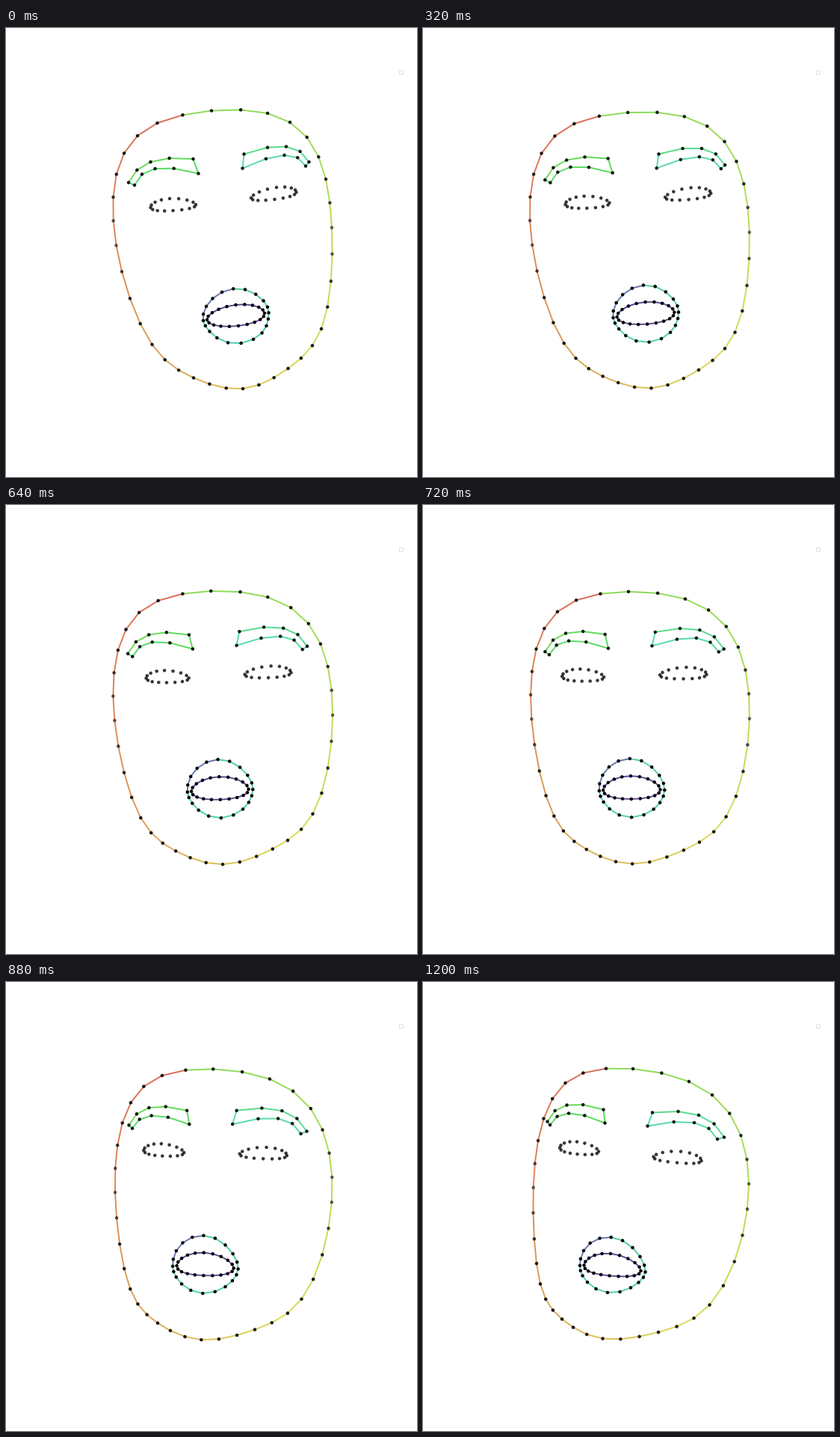
Animation, 550 px wide and 600 px high, one loop 1.28 s. Source, as a matplotlib script:

```python
import colorsys

import matplotlib.pyplot as plt
import numpy as np
from matplotlib.animation import FuncAnimation
from matplotlib.collections import LineCollection
from matplotlib.patches import FancyBboxPatch

W, H, DPI = 550, 600, 100
FRAMES, INTERVAL = 16, 80


def ring(count, *keys):
    """Closed trigonometric curve through evenly spaced key points."""
    keys = np.array(keys, float)
    n = len(keys)
    u = np.pi * (np.arange(count)[:, None] / count - np.arange(n) / n)
    at_key = np.isclose(np.sin(u), 0)
    safe = np.where(at_key, 1, u)
    weights = np.where(at_key, 1, np.sin(n * safe) / (n * np.tan(safe)))
    return weights @ keys


def arc(a, b, c):
    """Five points on the parabola through a, b and c."""
    t = np.linspace(0, 1, 5)[:, None]
    a, b, c = np.array([a, b, c], float)
    return (1 - t) * (1 - 2 * t) * a + 4 * t * (1 - t) * b + t * (2 * t - 1) * c


def brow(top, bottom):
    return np.vstack([arc(*top), arc(*bottom)])


def wave(amount, phase):
    return amount * np.cos(np.arange(36) * np.pi / 18 - np.radians(phase))


def ramp(first, last, count):
    return np.linspace(first, last, count)


def palette(hues, light=0.6, sat=0.65):
    return [colorsys.hls_to_rgb(h / 360, light, sat) for h in hues]


def lip_bow(lips):
    """The mouth opens upwards halfway through the turn."""
    return np.column_stack([np.full(len(lips), 0.8),
                            0.07 * (lips[:, 1] - 386) - 3])


# Key points of the face turned to one side (start) and the other (end).
outline = (
    ring(36, (275, 110.5), (380, 126), (428, 202), (436.5, 302),
         (422, 402), (377.5, 455), (317, 482), (251, 467.5),
         (195.5, 423), (155, 325.5), (143.5, 226), (176, 144)),
    ring(36, (281, 116), (387, 151), (433.5, 237), (427.5, 338.5),
         (383.5, 431.5), (315, 468), (240.5, 476.5), (186, 450.5),
         (157, 403.5), (147.5, 308.5), (154, 212), (190.5, 135)))
left_brow = (
    brow([(164, 206.5), (193.5, 179), (250.5, 175)],
         [(257.5, 194.5), (199.5, 188), (172, 210)]),
    brow([(166.5, 186.5), (192.5, 164.5), (241.5, 170.5)],
         [(243.5, 188.5), (195, 175.5), (170, 191)]))
right_brow = (
    brow([(318.5, 168.5), (375, 158.5), (405.5, 179)],
         [(401, 184.5), (372.5, 170), (316.5, 187.5)]),
    brow([(307, 174.5), (369, 178), (403, 207.5)],
         [(394, 210), (363, 188), (300.5, 192.5)]))
left_eye = (
    ring(16, (193.5, 240), (219, 228), (254, 236), (223.5, 244)),
    ring(16, (183, 221.5), (206, 213.5), (235, 226.5), (206.5, 230)))
right_eye = (
    ring(16, (328, 227), (362, 213), (388.5, 219.5), (359.5, 229)),
    ring(16, (308.5, 233.5), (345, 226.5), (372.5, 239), (340, 241.5)))
lips = (
    ring(20, (264, 391), (268, 372), (289, 353), (320, 349.5), (344.5, 364.5),
         (351.5, 380.5), (348.5, 398), (331, 416), (297, 420.5), (272.5, 405.5)),
    ring(20, (210, 379), (215, 359), (236.5, 342.5), (267, 345.5), (290.5, 367),
         (297.5, 387.5), (288.5, 401.5), (263.5, 414), (231.5, 410), (213.5, 392.5)))
mouth = (
    ring(20, (269, 390), (307.5, 370), (346, 381), (311, 398)),
    ring(20, (215.5, 378.5), (251, 363), (291.5, 386), (249.5, 392.5)))

outline_bow = np.column_stack([0.5 + wave(4.4, 150), 1.4 + wave(2.7, 290)])
outline_hues = np.r_[10 + 87 * ramp(1, 0, 35) ** 1.15, 97]
lip_colors = (palette(ramp(222, 228, 5), 0.55, 0.32)
              + palette(ramp(155, 170, 15), 0.56, 0.58))

# poses, bow of the path halfway, dot opacity, line colours
FEATURES = [
    (outline, outline_bow, None, palette(outline_hues)),
    (left_brow, (-2, 0.3), 0.9, palette(ramp(108, 135, 10))),
    (right_brow, (-1.5, -1.9), 0.9, palette(ramp(142, 160, 10))),
    (left_eye, (-1.7, -1), 0.78, None),
    (right_eye, (-0.5, -3.4), 0.78, None),
    (lips, lip_bow(lips[0]), 1, lip_colors),
    (mouth, lip_bow(mouth[0]), 1, palette(ramp(240, 268, 20), 0.45, 0.35)),
]


def turn(frame):
    return np.interp(frame, [0, 4, 6, 8, 10, 13, 15],
                     [0, 0.185, 0.315, 0.407, 0.667, 0.97, 1])


def pose(poses, bow, frame):
    t = turn(frame)
    return (1 - t) * poses[0] + t * poses[1] + 4 * t * (1 - t) * np.asarray(bow)


def dot_colors(points, opacity):
    rgba = np.zeros((len(points), 4))
    if opacity is None:  # the sides lie deeper, so they fade
        opacity = 0.9 - 0.32 * np.exp(-((points[:, 1] - 280) / 65) ** 2)
    rgba[:, 3] = opacity
    return rgba


fig = plt.figure(figsize=(W / DPI, H / DPI), dpi=DPI, facecolor="white")
ax = fig.add_axes([0, 0, 1, 1])
ax.set(xlim=(0, W), ylim=(H, 0))
ax.axis("off")
ax.add_patch(FancyBboxPatch((527, 57.5), 4, 4, facecolor="white",
                            boxstyle="round,pad=0.5,rounding_size=1",
                            edgecolor="#dddddd", linewidth=0.7))

artists = []
for poses, bow, opacity, colors in FEATURES:
    lines = None
    if colors is not None:
        lines = LineCollection([], colors=colors, linewidths=1.4, zorder=1)
        ax.add_collection(lines)
    dots = ax.scatter(*poses[0].T, s=10.5, linewidths=0, zorder=2,
                      color=dot_colors(poses[0], opacity))
    artists.append((lines, dots))


def draw(frame):
    for (poses, bow, opacity, _), (lines, dots) in zip(FEATURES, artists):
        p = pose(poses, bow, frame)
        if lines is not None:
            lines.set_segments(np.stack([p, np.roll(p, -1, axis=0)], axis=1))
        dots.set_offsets(p)
        dots.set_facecolor(dot_colors(p, opacity))
    return [a for pair in artists for a in pair if a is not None]


anim = FuncAnimation(fig, draw, frames=FRAMES, interval=INTERVAL,
                     init_func=lambda: draw(0), repeat=True, repeat_delay=0)
plt.show()
```
